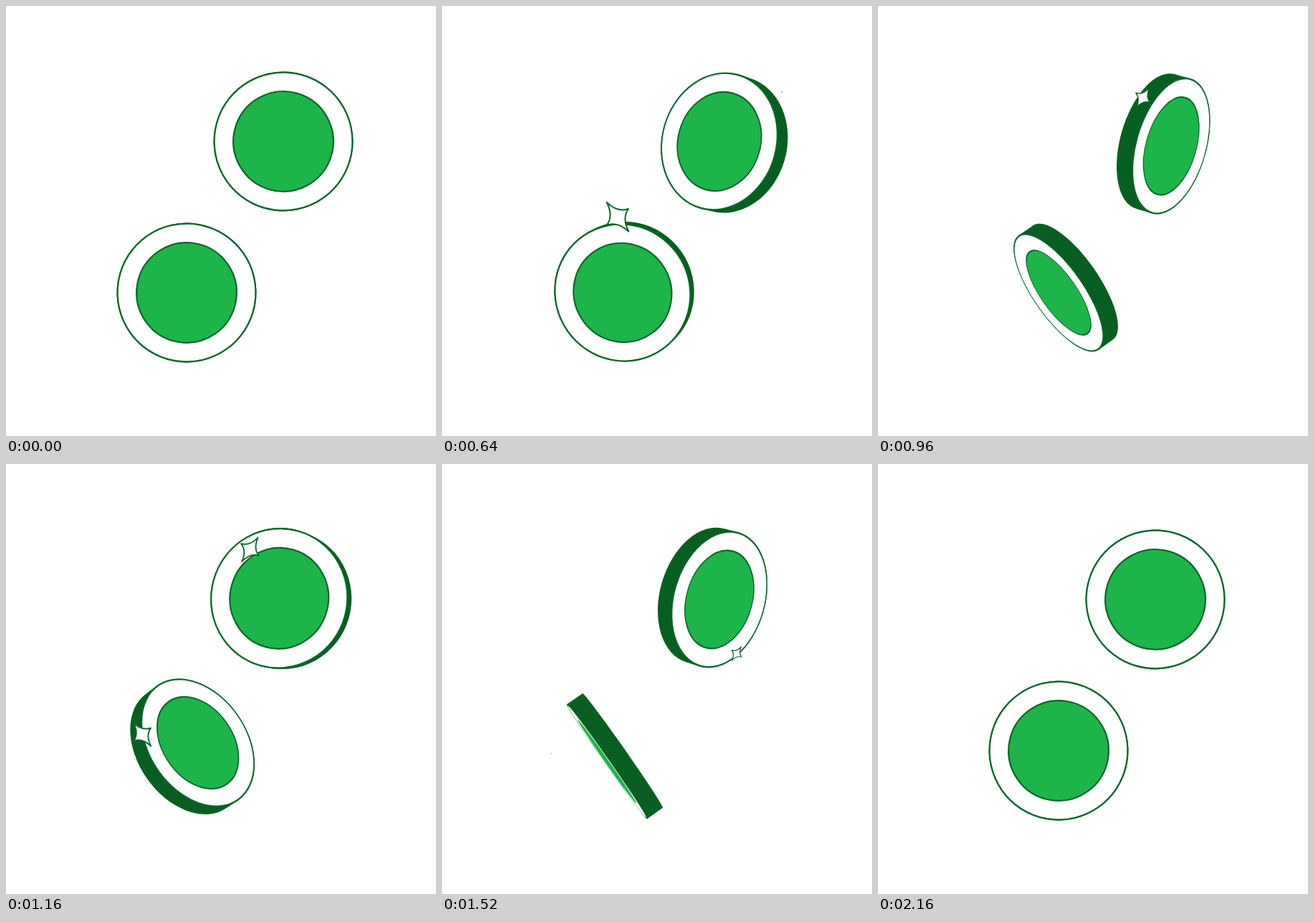
An HTML page with a canvas for the animation above (2.36 s loop, 600x600 px).

```html
<!DOCTYPE html>
<html lang="en">
<head>
<meta charset="utf-8">
<title>Flipping coins</title>
<style>
html, body { margin: 0; width: 100%; height: 100%; overflow: hidden; background: #fff; }
canvas { display: block; width: 600px; height: 600px; }
</style>
</head>
<body>
<canvas id="stage" width="600" height="600"></canvas>
<script>
const ctx = document.getElementById('stage').getContext('2d');
const LOOP = 2360, STEP = 40, LAST = 53;
const RIM = 96.4, DISC = 69.8, DEPTH = 26.6, VIEW = 2500;
const EDGE = '#065f20', LINE = '#0a662a', FILL = '#1db44a';
const rad = d => d * Math.PI / 180;

// axis: tilt of the flip direction, lean: tilt of the sparkles, delay in steps
const coins = [
  { x: 387, y: 189, axis: rad(16), lean: rad(34), delay: 0 },
  { x: 252, y: 400, axis: rad(-35), lean: rad(-37), delay: 4 }
];

// flip angle in degrees over steps
const flip = [[0, 0], [11, 14], [15, 34.5], [19, 69], [23, 120], [28, 193],
  [32, 252.5], [33, 268], [37, 311], [41, 339.5], [45, 352], [49, 360]];

// peak step, full size, height across the axis, path along the axis
const sparkles = [
  { peak: 8, size: 38, v: -90.5, path: [[1, 20], [8, 42], [11, 55], [15, 64.5]] },
  { peak: 26, size: 24, v: -54, path: [[19, -32], [23, -33.5], [28, -64], [33, -84]] },
  { peak: 41, size: 24, v: 66, path: [[34, 31], [37, 44], [41, 57], [48, 59]] }
];

// Smooth curve through keys, at rest at both ends
function curve(keys, t) {
  const n = keys.length - 1;
  if (t <= keys[0][0]) return keys[0][1];
  if (t >= keys[n][0]) return keys[n][1];
  let i = 0;
  while (t > keys[i + 1][0]) i++;
  const gap = j => keys[j + 1][0] - keys[j][0];
  const rate = j => (keys[j + 1][1] - keys[j][1]) / gap(j);
  const slope = j => j === 0 || j === n ? 0 :
    (gap(j) * rate(j - 1) + gap(j - 1) * rate(j)) / (gap(j) + gap(j - 1));
  const h = gap(i), s = (t - keys[i][0]) / h, s2 = s * s, s3 = s2 * s;
  return keys[i][1] + (keys[i + 1][1] - keys[i][1]) * (3 * s2 - 2 * s3) +
    h * (slope(i) * (s3 - 2 * s2 + s) + slope(i + 1) * (s3 - s2));
}

function disc(r, fill, line, width) {
  ctx.beginPath();
  ctx.arc(0, 0, r, 0, 2 * Math.PI);
  ctx.fillStyle = fill;
  ctx.fill();
  if (!line) return;
  ctx.strokeStyle = line;
  ctx.lineWidth = width;
  ctx.stroke();
}

// Draw inside a frame squashed along the axis
function squashed(u, ratio, size, draw) {
  ctx.save();
  ctx.translate(u, 0);
  ctx.scale(Math.max(ratio, 0.001) * size, size);
  draw();
  ctx.restore();
}

function drawCoin(angle) {
  const c = Math.cos(angle), ratio = Math.abs(c);
  const back = DEPTH * Math.sin(angle);
  const near = 1 - DEPTH * c / VIEW;
  const r = RIM + 1.1, rb = r * near;
  const body = () => disc(r, EDGE);
  squashed(0, ratio, 1, body);
  squashed(back, ratio, near, body);
  ctx.beginPath();
  ctx.moveTo(0, -r);
  ctx.lineTo(back, -rb);
  ctx.lineTo(back, rb);
  ctx.lineTo(0, r);
  ctx.fillStyle = EDGE;
  ctx.fill();
  const front = c >= 0;
  squashed(front ? 0 : back, ratio, front ? 1 : near, () => {
    disc(RIM, '#fff', LINE, 2.2);
    disc(DISC, FILL, LINE, 2.2);
  });
}

function drawStar(size) {
  const tips = [[0, -size], [size * 0.74, 0], [0, size], [-size * 0.74, 0]];
  ctx.beginPath();
  ctx.moveTo(...tips[0]);
  for (let i = 0; i < 4; i++) {
    const a = tips[i], b = tips[(i + 1) % 4];
    ctx.quadraticCurveTo((a[0] + b[0]) * 0.185, (a[1] + b[1]) * 0.185, b[0], b[1]);
  }
  ctx.closePath();
  ctx.fillStyle = '#fff';
  ctx.fill();
  ctx.strokeStyle = LINE;
  ctx.lineJoin = 'round';
  ctx.lineWidth = Math.min(2, 0.4 + size * 0.07);
  ctx.stroke();
}

function render(step) {
  ctx.fillStyle = '#fff';
  ctx.fillRect(0, 0, 600, 600);
  for (const coin of coins) {
    const t = step - coin.delay;
    ctx.save();
    ctx.translate(coin.x, coin.y);
    ctx.rotate(coin.axis);
    drawCoin(rad(curve(flip, t)));
    for (const s of sparkles) {
      const d = Math.abs(t - s.peak) / 7.7;
      if (d >= 1) continue;
      ctx.save();
      ctx.translate(curve(s.path, t), s.v);
      ctx.rotate(coin.lean - coin.axis);
      drawStar(s.size * (1 + Math.cos(Math.PI * d)) / 2);
      ctx.restore();
    }
    ctx.restore();
  }
}

const start = performance.now();
function tick() {
  const ms = (performance.now() - start) % LOOP;
  render(Math.max(0, Math.min(LAST, Math.floor(ms / STEP) - 1)));
  requestAnimationFrame(tick);
}
tick();
</script>
</body>
</html>
```
